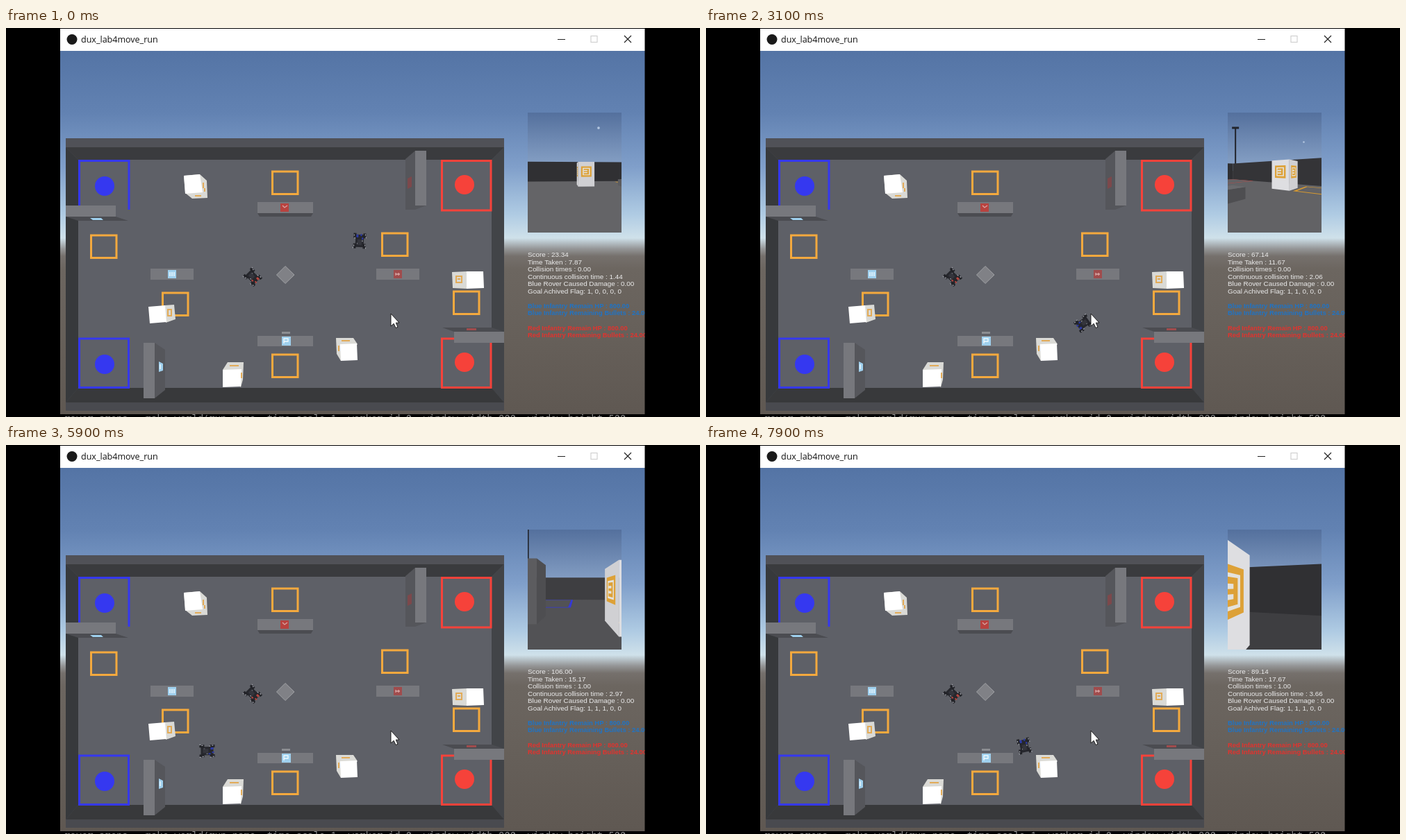
Write an HTML page with a canvas that moves like this. It is 999x561 px and loops after 8 s.

```html
<!DOCTYPE html>
<html lang="en">
<head>
<meta charset="utf-8">
<title>Rover arena</title>
<style>
  html, body { margin: 0; width: 100%; height: 100%; overflow: hidden; background: #000; }
  svg, canvas { position: absolute; left: 0; top: 0; display: block; }
  canvas { left: 751px; top: 122px; }
  .title { font: 12.5px "Open Sans", "Noto Sans", sans-serif; fill: #111; }
  .shell { font: 13.9px "Noto Sans Mono", "DejaVu Sans Mono", monospace; fill: #8c8c8c; }
  .stat { font: 9.9px "Liberation Sans", Arial, sans-serif; fill: #ececec; }
  .team { font: bold 9.4px "Liberation Sans", Arial, sans-serif; }
</style>
</head>
<body>
<svg width="999" height="561" viewBox="0 0 999 561">
  <defs>
    <linearGradient id="sky" gradientUnits="userSpaceOnUse" x1="0" y1="33" x2="0" y2="557">
      <stop offset="0" stop-color="#5474a5"/>
      <stop offset=".17" stop-color="#6282b2"/>
      <stop offset=".32" stop-color="#809fca"/>
      <stop offset=".45" stop-color="#afcbe3"/>
      <stop offset=".515" stop-color="#cfe1ea"/>
      <stop offset=".545" stop-color="#949596"/>
      <stop offset=".565" stop-color="#75706c"/>
      <stop offset=".6" stop-color="#6c6660"/>
      <stop offset="1" stop-color="#5f5852"/>
    </linearGradient>
    <clipPath id="win"><rect x="78" y="33" width="841.5" height="524"/></clipPath>
    <g id="rover">
      <path d="M-9-6H9V6H-9Z" fill="#26272d"/>
      <path d="M-11-9h7v4h-7ZM4-9h7v4H4ZM-11 5h7v4h-7ZM4 5h7v4H4Z" fill="#222328"/>
      <path d="M-10-8h2M-6-9h2M5-8h2M9-9h2M-9 8h2M-5 7h2M6 8h2M9 9h2M-1-4h2M3 3h2" stroke="#a4a6ae" stroke-width="1.2"/>
      <path d="M-10-3h3v2h-3ZM-9 2h4v3h-4ZM-5-5h3v2h-3Z" fill="currentColor"/>
      <path d="M-2-3H6V3H-2Z" fill="#34353c"/>
    </g>
  </defs>

  <text class="shell" x="84" y="568">rover_arena = make_world(run_name, time_scale=1, worker_id=0, window_width=800, window_height=500</text>
  <rect x="78" y="1" width="841.5" height="32" fill="#fff"/>
  <circle cx="95" cy="16.5" r="7.5" fill="#1a1a1a"/>
  <text class="title" x="108" y="21">dux_lab4move_run</text>
  <g fill="none" stroke="#222" stroke-width="1.2">
    <path d="M794 16.500h11M890 11l10 10M900 11l-10 10"/>
    <rect x="842" y="11.5" width="9" height="9" stroke="#d0d0d0"/>
  </g>
  <rect x="78" y="33" width="841.5" height="524" fill="url(#sky)"/>

  <!-- arena shell -->
  <path d="M86 159H717V552H86Z" fill="#505157"/>
  <path d="M86 172H717L699 190H104Z" fill="#3a3b3e"/>
  <path d="M86 172L104 190V519L86 540Z" fill="#37393c"/>
  <path d="M717 172L699 190V519L717 540Z" fill="#424448"/>
  <path d="M104 519H699L717 540H86Z" fill="#38393b"/>
  <path d="M86 540H717V552H86Z" fill="#494a4f"/>
  <path d="M104 190H699V519H104Z" fill="#5e6067"/>

  <g fill="none" stroke-width="3">
    <path d="M105.500 262V191.500H177V262M105.500 448H176.500V518.500H105.500Z" stroke="#3538f0"/>
    <path d="M627.500 191.500H698V263H627.500ZM627.500 448H698V518.500H627.500Z" stroke="#f6423a"/>
    <path id="goals" stroke="#f4a93e"/>
  </g>
  <g fill="#3538f0"><circle cx="142" cy="228" r="14"/><circle cx="142" cy="485" r="14"/></g>
  <g fill="#f6423a"><circle cx="660" cy="226" r="14"/><circle cx="660" cy="482" r="14"/></g>

  <!-- panels -->
  <g fill="#77787d">
    <path d="M86 256H158V272H86ZM362 251H442V267H362ZM208 347H270V363H208ZM533 347H595V363H533ZM362 444H442V459H362ZM645 438H717V454H645ZM589 177H605V256H589ZM198 454H214V534H198Z"/>
    <path d="M402 343.500L415 356 402 368.500 389.500 356Z" fill="#808186" stroke="#a0a1a5"/>
  </g>
  <g fill="#4b4c51">
    <path d="M86 272H158L176 278H104ZM362 267H442L439 272H365ZM645 438H717L699 432H628Z"/>
    <path d="M589 177V256H605L589 262H575V189Z" fill="#55565b"/>
    <path d="M214 454L229 464V522L214 534Z" fill="#55565b"/>
  </g>
  <path d="M397 438h12v3h-12Z" fill="#8b8d92"/>
  <path d="M395 253h12v12h-12Z" fill="#b8423f"/>
  <path d="M558 349h12v12h-12ZM663 433h14v3h-14Z" fill="#a04c4d"/>
  <path d="M578 217l6-3v15l-6 3Z" fill="#7c484b"/>
  <path d="M398 256l3 3 4-3M561 353v4M565 353v4M561 355h6" stroke="#d8a5a4" stroke-width="1.3" fill="none"/>
  <g fill="#9fd0ee">
    <path d="M233 349h12v12h-12ZM397 445h13v13h-13ZM220 481l6 3v10l-6 2ZM121 274h16l3 3h-15Z"/>
    <path d="M236 352v6M239 352v6M242 352v6M400 455v-7h6v4h-6M222 485v7" stroke="#f2fbff" stroke-width="1.4" fill="none"/>
  </g>

  <!-- cubes -->
  <g fill="#dadad6">
    <path d="M256 213L279 211 289 220 290 245 268 246 258 238Z"/>
    <path d="M642 352L664 351V376L643 375Z"/>
    <path d="M228 400L242 399 244 420 230 425Z"/>
    <path d="M319 482L342 482 341 507 338 518 312 493Z"/>
    <path d="M475 447H500L506 456 482 480 476 470Z"/>
  </g>
  <path d="M256 213L279 211 283 237 258 239ZM663 351H687L688 375 663 376ZM205 402L229 400 231 424 207 426ZM312 493L339 492 338 517 312 518ZM481 456L505 455 506 479 482 480Z" fill="#fff"/>
  <path d="M284 223v8M286 231v5M272 242h9M648 358h8v9h-8ZM650 362h4M233 406h5v9h-5ZM322 487h13M339 497v8M483 451h12M479 458v8" stroke="#e2ab58" stroke-width="2" fill="none"/>

  <use href="#rover" color="#b8463f" transform="translate(355 359) rotate(-135)"/>
  <use href="#rover" id="mover" color="#2c3aa8"/>
  <path d="M554 412V430L558.200 426.300 561 432.500 564 431.200 561.300 425.200 566 425Z" fill="#fff" stroke="#111" stroke-width=".9"/>

  <g id="stats" class="stat"></g>
  <g class="team" clip-path="url(#win)">
    <g fill="#1f74c6">
      <text x="751" y="403.5">Blue Infantry Remain HP : 800.00</text>
      <text x="751" y="414">Blue Infantry Remaining Bullets : 24.00</text>
    </g>
    <g fill="#e2332e">
      <text x="751" y="435.5">Red Infantry Remain HP : 800.00</text>
      <text x="751" y="446">Red Infantry Remaining Bullets : 24.00</text>
    </g>
  </g>
</svg>
<canvas id="view" width="135" height="173"></canvas>

<script>
const LOOP = 8000, STEP = 100;
const W = 135, H = 173, HORIZON = 84, FOCAL = 152, EYE = 21, NEAR = 2;
const ctx = document.getElementById('view').getContext('2d');
const mover = document.getElementById('mover');
const stats = document.getElementById('stats');

// time, x, y, heading in degrees, floor brightness in the camera
const poses = [
  [0, 509, 307, 93, 100], [800, 512, 352, 70, 92], [1300, 545, 384, 30, 75],
  [2000, 606, 394, -10, 62], [2350, 632, 396, -20, 70], [3100, 543, 426, -35, 98],
  [3800, 462, 410, -75, 100], [4500, 389, 420, -122, 104], [5300, 251, 425, -162, 95],
  [5700, 272, 436, -170, 85], [6500, 342, 457, -213.5, 74], [7000, 386, 476, -235, 70],
  [7400, 432, 476, -255, 66], [7900, 458, 434, -282, 62], [8000, 462, 426, -288, 62]
];
const contact = [
  [0, 1.44], [600, 1.44], [1500, 2.06], [3300, 2.06], [4200, 2.72], [5000, 2.72],
  [5200, 2.8], [5300, 2.82], [6200, 3.04], [6900, 3.04], [7700, 3.66], [8000, 3.66]
];

function sample(keys, t) {
  let i = 1;
  while (i < keys.length - 1 && keys[i][0] < t) i++;
  const a = keys[i - 1], b = keys[i];
  const k = Math.min(1, Math.max(0, (t - a[0]) / (b[0] - a[0])));
  return a.slice(1).map((v, n) => v + (b[n + 1] - v) * k);
}

const rect = (x, y, w, h) => [[x, y], [x + w, y], [x + w, y + h], [x, y + h]];
const goals = [[382, 206], [121, 298], [540, 295], [224, 381], [643, 379], [382, 470]];
document.getElementById('goals').setAttribute('d',
  goals.map(([x, y]) => `M${x + 1.5} ${y + 1}h36.5v32.5h-36.5Z`).join(''));

const BLUE = '#7db3e2', RED = '#c2403c', ORANGE = '#dda137';
const TAG_HALF = 7;
const cube = (x, y) => ({ base: rect(x, y, 22, 23), h: 33, tone: 222, tag: ORANGE });
const panel = (x, y, w, d, h, tag) => ({ base: rect(x, y, w, d), h, tone: 92, tag });
const solids = [
  cube(268, 222), cube(643, 352), cube(222, 400), cube(320, 483), cube(475, 447),
  panel(365, 257, 74, 14, 9), panel(208, 347, 62, 16, 9),
  panel(533, 347, 62, 16, 9), panel(365, 441, 74, 14, 9),
  panel(211, 464, 18, 58, 38, BLUE), panel(575, 189, 16, 73, 38, RED),
  panel(104, 262, 72, 16, 38, BLUE), panel(628, 433, 71, 15, 38, RED),
  { base: [[402, 344], [414, 356], [402, 368], [390, 356]], h: 9, tone: 110 },
  { rover: true, base: [[355, 359]] }
];
for (const s of solids)
  s.mid = [0, 1].map(n => s.base.reduce((sum, p) => sum + p[n], 0) / s.base.length);

const lamps = [[85, 170], [720, 170], [85, 535], [720, 535]];
const glints = [[740, 356, 76], [470, 445, 78]];
const gray = v => `rgb(${v | 0},${v | 0},${v + 3 | 0})`;

let cam;

// world point to [depth, side, height]
function toCam([x, y, z]) {
  const dx = x - cam.x, dy = y - cam.y;
  return [dx * cam.cos + dy * cam.sin, dy * cam.cos - dx * cam.sin, z];
}
const toScreen = ([d, s, z]) => [W / 2 + FOCAL * s / d, HORIZON + FOCAL * (EYE - z) / d];

function fill3d(points, color) {
  const src = points.map(toCam), out = [];
  src.forEach((a, i) => {
    const b = src[(i + 1) % src.length];
    if (a[0] >= NEAR) out.push(a);
    if ((a[0] >= NEAR) !== (b[0] >= NEAR)) {
      const k = (NEAR - a[0]) / (b[0] - a[0]);
      out.push(a.map((v, n) => v + (b[n] - v) * k));
    }
  });
  if (out.length < 3) return;
  ctx.fillStyle = color;
  ctx.beginPath();
  out.map(toScreen).forEach(p => ctx.lineTo(...p));
  ctx.fill();
}

const flat = (base, z, color) => fill3d(base.map(p => [...p, z]), color);

function side(a, b, u0, u1, z0, z1, color) {
  const at = (u, z) => [a[0] + (b[0] - a[0]) * u, a[1] + (b[1] - a[1]) * u, z];
  fill3d([at(u0, z0), at(u1, z0), at(u1, z1), at(u0, z1)], color);
}

function drawTag(a, b, color) {
  const half = TAG_HALF / Math.hypot(b[0] - a[0], b[1] - a[1]);
  const part = (u0, u1, v0, v1, c) =>
    side(a, b, .5 + u0 * half, .5 + u1 * half, 20 + v0 * TAG_HALF, 20 + v1 * TAG_HALF, c);
  part(-1, 1, -1, 1, color);
  if (color === ORANGE) {
    part(-.7, .7, -.7, .7, '#e4e2dc');
    part(-.5, .5, -.55, .55, color);
    part(-.2, .5, .1, .3, '#e4e2dc');
    part(-.2, .5, -.3, -.1, '#e4e2dc');
  } else {
    part(-.6, -.3, -.6, .6, '#eef6fb');
    part(.3, .6, -.6, .6, '#eef6fb');
    part(-.3, .3, -.15, .15, '#eef6fb');
  }
}

function drawSolid(s) {
  const { base, h, tone, tag } = s;
  base.forEach((a, i) => {
    const b = base[(i + 1) % base.length];
    const dx = b[0] - a[0], dy = b[1] - a[1];
    if (dx * (cam.y - a[1]) - dy * (cam.x - a[0]) >= 0) return;
    side(a, b, 0, 1, 0, h, gray(tone - (Math.abs(dx) > Math.abs(dy) ? 14 : 0)));
    if (tag && Math.hypot(dx, dy) > 20) drawTag(a, b, tag);
  });
  if (h < EYE) flat(base, h, gray(tone + 14));
}

function drawRover([x, y]) {
  const p = toCam([x, y, 0]);
  if (p[0] < 10) return;
  const [sx, sy] = toScreen(p), k = FOCAL / p[0];
  const box = (color, x, y, w, h) => { ctx.fillStyle = color; ctx.fillRect(x, y, w, h); };
  ctx.save();
  ctx.translate(sx, sy + 3);
  ctx.scale(k, k);
  box('#1c1c20', -9, -13, 18, 8);
  box('#d33a28', -9, -14.5, 19, 2);
  box('#d33a28', -3, -10, 6, 1.5);
  box('#18181b', -4, -20, 8, 6);
  box('#222328', -2.5, -24, 5, 4);
  for (const [wx, wy, r] of [[-10, -5, 4.5], [11, -6, 4], [-5, -3.5, 3.5], [6, -3.5, 3.5]]) {
    ctx.fillStyle = '#222226';
    ctx.beginPath(); ctx.arc(wx, wy, r, 0, 7); ctx.fill();
    ctx.fillStyle = '#a9a9ad';
    ctx.beginPath(); ctx.arc(wx, wy, r * .45, 0, 7); ctx.fill();
  }
  ctx.restore();
}

function drawLamp([x, y]) {
  const p = toCam([x, y, 141]);
  if (p[0] < 20) return;
  const [sx, sy] = toScreen(p);
  ctx.fillStyle = '#22242b';
  ctx.fillRect(sx - 1, sy, 2, HORIZON - sy);
  ctx.fillRect(sx - 5, sy - 1, 10, 3);
}

function drawView([x, y, heading, light]) {
  const a = heading * Math.PI / 180;
  cam = { x, y, cos: Math.cos(a), sin: Math.sin(a) };
  const sky = ctx.createLinearGradient(0, 0, 0, HORIZON);
  sky.addColorStop(0, '#54709d');
  sky.addColorStop(1, '#8ba5c9');
  ctx.fillStyle = sky;
  ctx.fillRect(0, 0, W, HORIZON);
  const floor = gray(light);
  ctx.fillStyle = floor;
  ctx.fillRect(0, HORIZON, W, H - HORIZON);

  for (const g of glints) {
    const p = toCam(g);
    if (p[0] < 40) continue;
    ctx.fillStyle = '#b4c6e0';
    ctx.beginPath(); ctx.arc(...toScreen(p), 260 / p[0], 0, 7); ctx.fill();
  }
  lamps.forEach(drawLamp);

  const arena = rect(104, 190, 595, 329);
  [47, 52, 48, 62].forEach((tone, i) =>
    side(arena[i], arena[(i + 1) % 4], 0, 1, 0, 39, gray(tone)));

  const ring = (x, y, w, h, color) => {
    flat(rect(x, y, w, h), 0, color);
    flat(rect(x + 3, y + 3, w - 6, h - 6), 0, floor);
  };
  for (const [gx, gy] of goals) ring(gx, gy, 40, 35, '#d99a2e');
  for (const gy of [190, 447]) {
    ring(104, gy, 74, 73, '#3538d8');
    ring(626, gy, 73, 73, '#d8403a');
  }

  const dist = s => Math.hypot(s.mid[0] - x, s.mid[1] - y);
  [...solids].sort((p, q) => dist(q) - dist(p))
    .forEach(s => s.rover ? drawRover(s.mid) : drawSolid(s));
}

const lines = Array.from({ length: 6 }, (_, i) => {
  const line = document.createElementNS('http://www.w3.org/2000/svg', 'text');
  line.setAttribute('x', 751);
  line.setAttribute('y', 330 + i * 10.5);
  return stats.appendChild(line);
});

function drawStats(t) {
  const reached = 1 + (t >= 2400) + (t >= 5200);
  const taken = 7.87 + Math.floor(t / 80) / 10;
  const [hit] = sample(contact, t);
  const [scored] = sample(contact, Math.max(0, t - STEP));
  const score = 60 * reached + .01 - taken - 20 * scored;
  const flags = [0, 1, 2, 3, 4].map(i => +(i < reached)).join(', ');
  [
    `Score : ${score.toFixed(2)}`,
    `Time Taken : ${taken.toFixed(2)}`,
    `Collision times : ${t >= 5100 ? '1.00' : '0.00'}`,
    `Continuous collision time : ${hit.toFixed(2)}`,
    'Blue Rover Caused Damage : 0.00',
    `Goal Achived Flag: ${flags}`
  ].forEach((text, i) => { lines[i].textContent = text; });
}

let shown = -1;
function frame(now) {
  const t = Math.floor(now % LOOP / STEP) * STEP;
  if (t !== shown) {
    shown = t;
    const pose = sample(poses, t);
    mover.setAttribute('transform', `translate(${pose[0]} ${pose[1]}) rotate(${pose[2]})`);
    drawView(pose);
    drawStats(t);
  }
  requestAnimationFrame(frame);
}
frame(performance.now());
</script>
</body>
</html>
```
